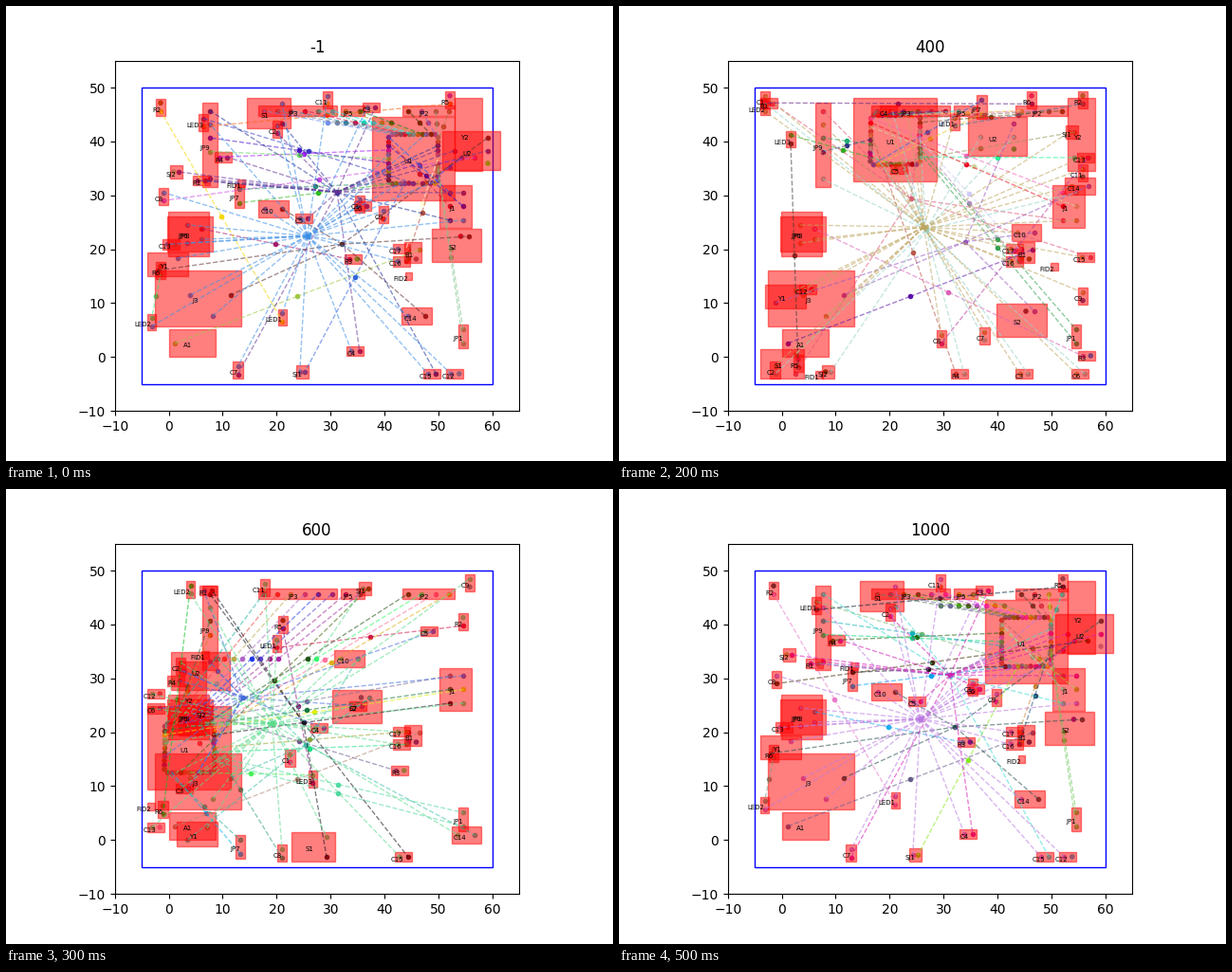
Animation of 640x480 px, one loop 600 ms. Source, as a matplotlib script:

```python
import random

import matplotlib.pyplot as plt
from matplotlib.animation import FuncAnimation
from matplotlib.patches import Rectangle

SCALE, X0, Y0 = 5.6862, 171.63, 370.34   # pixels per mm, pixel position of (0, 0)


def to_mm(x, y):
    return (x - X0) / SCALE, (Y0 - y) / SCALE


def row(count, pitch=14.44):
    return [(i - (count - 1) / 2) * pitch for i in range(count)]


def quad_pins(reach=26, pitch=4.55):
    steps = row(11, pitch)
    return ([(-reach, s) for s in steps] + [(s, reach) for s in steps]
            + [(reach, s) for s in steps] + [(s, -reach) for s in steps])


# name: (width, height, pin offsets), in pixels with y pointing down
SHAPES = {
    "A1": (49.5, 29, [(-19, 0.5)]),
    "B1": (18, 22, [(-5, -3), (6.5, -3), (-5, 7), (3, 7)]),
    "J1": (34, 45, [(x, y) for y in row(3) for x in (-6, 8.5)]),
    "J3": (91, 59, [(-8.5, -3.5), (15.5, 18.5), (34, -3.5)]),
    "JP1": (10.5, 25, [(0, y) for y in row(2)]),
    "JP2": (55, 11.5, [(x, 0) for x in row(4)]),
    "JP3": (83, 11.5, [(x, 0) for x in row(6)]),
    "JP5": (25, 11.5, [(x, 0) for x in row(2)]),
    "JP6": (43, 47, [(-1.5, -9.5), (-1.5, 9.5)]),
    "JP7": (10.5, 25, [(0, y) for y in row(2)]),
    "JP8": (48, 37, [(12, -5.5), (12, 5.5)]),
    "JP9": (16.5, 89, [(0, y) for y in (-36, -22, -7.5, 7, 36)]),
    "S1": (46, 31.5, [(14, -10.5), (14, 10.5)]),
    "S2": (52.5, 35, [(13.5, -9.5), (4.5, -9.5)]),
    "U1": (87.5, 87.5, quad_pins()),
    "U2": (61.5, 41, [(17.5, -13.5), (17.5, 0), (17.5, 13.5), (-17.5, 0)]),
    "Y1": (43.5, 25.5, [(-10.5, 6.5), (10.5, -6.5)]),
    "Y2": (28.5, 77.5, [(-7, 24.5), (7, 24.5)]),
}
KINDS = {
    "C": (18, 10.5, [(-4.3, 0), (4.3, 0)]),
    "R": (18, 10.5, [(-4.3, 0), (4.3, 0)]),
    "LED": (17.5, 9.3, [(-4.3, 0), (4.3, 0)]),
    "SJ": (13, 14, [(-2.7, 0), (2.7, 0)]),
    "FID": (7.2, 7.2, []),
}
SHAPES["C10"] = SHAPES["C14"] = (31.5, 18.2, [(-9, 0), (9, 0)])

FIXED = dict(
    A1=(196.5, 355.5), B1=(429.5, 260), J1=(474, 211.5), J3=(202.5, 308.5),
    JP1=(482, 348.5), JP2=(445.5, 110.5), JP3=(307.7, 110.5),
    JP5=(365.5, 110.5), JP6=(192.5, 240.5), JP8=(194, 240.5),
    JP9=(215, 146.5), C16=(417.5, 269.5), C17=(417.5, 256))

# Each layout: part centres and the names of parts standing upright
FIRST = (dict(
    C1=(373, 209), C2=(286, 130), C3=(385, 107), C4=(368.5, 364),
    C5=(314, 224), C6=(376, 211), C7=(244.5, 384.5), C8=(166, 201),
    C9=(398, 220.5), C10=(282, 214), C11=(339, 99), C12=(473.5, 388),
    C13=(174, 251.5), C14=(433, 327), C15=(449, 388), R1=(206, 184),
    R2=(163, 106.5), R3=(366, 267), R4=(229, 159.5), R5=(468, 99),
    R6=(163, 279), LED1=(291.5, 328.5), LED2=(153.5, 333.5),
    LED3=(208, 123), S1=(277, 113), S2=(475, 252.5), SJ1=(312.5, 386),
    SJ2=(179.5, 175), U1=(429.5, 161), U2=(490.5, 152.5), Y1=(170.5, 272.5),
    Y2=(487.5, 135.5), JP7=(246, 200.5), FID1=(248, 187), FID2=(424.5, 285)),
    "C1 C2 C7 C8 C9 C11 R2 R5 R6 LED1 LED2 LED3".split())

SECOND = (dict(
    C1=(154, 316), C2=(351, 260.5), C3=(492.5, 264), C4=(158, 102.5),
    C5=(492.5, 102.5), C6=(492.5, 388), C7=(275, 251.5), C8=(154, 384),
    C9=(304.5, 301), C10=(315, 107), C11=(154, 99), C12=(158, 263.5),
    C13=(157.5, 346), C14=(165, 298), C15=(279.5, 102.5), R1=(367, 139),
    R2=(335, 116), R3=(154, 298), R4=(198.5, 110.5), R5=(276, 275),
    R6=(347, 139), LED1=(153.5, 384), LED2=(280.5, 384), LED3=(422, 384),
    S1=(172, 282), S2=(279.5, 115), SJ1=(365.5, 204.5), SJ2=(495, 104),
    U1=(458, 141), U2=(364.5, 138), Y1=(170.5, 110), Y2=(200.5, 313.5),
    JP7=(482, 358.5), FID1=(326, 266), FID2=(436, 272.5)),
    "C1 C2 C7 C8 C9 C11 R2 R3 R5 R6 LED1 LED2 LED3".split())

THIRD = (dict(
    C1=(154, 99), C2=(164.5, 384), C3=(427, 388), C4=(284, 110.5),
    C5=(295.5, 172), C6=(486.5, 388), C7=(385.5, 348), C8=(340, 351.5),
    C9=(489, 306.5), C10=(429.5, 239), C11=(489, 176), C12=(199, 299),
    C13=(492, 160), C14=(486, 190), C15=(492.5, 265), R1=(158, 102.5),
    R2=(489, 99), R3=(493, 369), R4=(359.5, 388), R5=(189, 377),
    R6=(435, 99), LED1=(354, 122), LED2=(154, 106.5), LED3=(181, 140.5),
    S1=(172, 377.5), S2=(424.5, 331.5), SJ1=(477.5, 133), SJ2=(220.5, 386),
    U1=(291, 141), U2=(399, 137.5), Y1=(175.5, 306.5), Y2=(487.5, 135.5),
    JP7=(382.5, 106.5), FID1=(211, 389), FID2=(459, 275)),
    "C1 C2 C7 C8 C9 C11 R2 R5 R6 LED1 LED2 LED3".split())

FOURTH = (dict(
    C1=(299.5, 284), C2=(184, 187), C3=(188, 316), C4=(330.5, 252),
    C5=(446, 150), C6=(158, 231.5), C7=(371, 229), C8=(291, 384.5),
    C9=(489, 99), C10=(362, 179), C11=(273, 104), C12=(158, 216),
    C13=(158, 357), C14=(485.5, 365), C15=(419.5, 388), R1=(213, 107),
    R2=(482, 140), R3=(415.5, 297), R4=(179, 202.5), R5=(292, 143),
    R6=(165.5, 338.5), LED1=(285.5, 163), LED2=(194.5, 106),
    LED3=(323.5, 306), S1=(324, 377.5), S2=(370, 229.5), SJ1=(379, 105),
    SJ2=(211, 236), U1=(193, 273), U2=(205, 192), Y1=(201.5, 364),
    Y2=(196.5, 221), JP7=(247, 377.5), FID1=(210, 175), FID2=(153, 335)),
    "C1 C2 C8 C9 C11 R2 R5 R6 LED1 LED2 LED3".split())

FIFTH = (dict(
    C1=(253.5, 110.5), C2=(244, 313), C3=(178.5, 167), C4=(397, 267),
    C5=(279.5, 263), C6=(309, 286), C7=(223, 223), C8=(421, 179),
    C9=(457, 294), C10=(392, 171), C11=(157.5, 388), C12=(301, 230),
    C13=(430, 210), C14=(218, 106.5), C15=(492, 268), R1=(466.5, 103),
    R2=(388, 355), R3=(192, 132), R4=(283, 253), R5=(314, 263),
    R6=(360.5, 347), LED1=(153.5, 348.5), LED2=(153.5, 338.5),
    LED3=(436, 254), S1=(274.5, 283.5), S2=(181, 240), SJ1=(466.5, 386),
    SJ2=(155.5, 334), U1=(374.5, 275), U2=(329, 272), Y1=(262.5, 110),
    Y2=(286.5, 136), JP7=(482, 380.5), FID1=(288, 223), FID2=(364.5, 101)),
    "C2 C3 C4 C7 C8 C12 R2 R5 R6 LED1 LED2 LED3".split())

LAYOUTS = [FIRST, SECOND, THIRD, FOURTH, FIFTH, FIRST]
TITLES = ["-1", "200", "400", "600", "800", "1000"]

GROUND = [f"C{i}.0" for i in range(1, 18)] + (
    "U1.4 U1.13 U1.32 U1.41 JP9.1 J3.0 J3.1 J1.5 JP6.0 JP6.1 JP8.1 "
    "S1.0 Y1.1 LED1.0 LED2.1 SJ1.0").split()
SUPPLY = ("C2.1 C3.1 C4.1 C5.1 C6.1 C7.1 U1.7 U1.18 U1.25 J1.1 JP9.4 "
          "U2.1 U2.3 R1.0 R4.1 SJ2.1").split()
RESET = "J1.4 S1.1 C15.1 R1.1 JP9.0 U1.24".split()
INPUT = "U2.0 C14.1 C10.1 S2.0 J3.2 Y1.0".split()
SERIAL = ["JP1.0 U1.29".split(), "JP1.1 U1.30".split()]

PAIRS = [(f"JP3.{i}", f"U1.{33 + i}") for i in range(6)]
PAIRS += [pair.split("-") for pair in (
    "JP5.0-U1.39 JP5.1-U1.40 JP2.0-U1.42 JP2.1-U1.43 JP2.2-U1.22 "
    "JP2.3-U1.23 C17.1-U1.27 C16.1-U1.28 JP9.2-U1.6 JP9.3-U1.5 "
    "LED1.1-R2.1 LED2.0-R6.1 LED3.1-R5.1 A1.0-B1.1 J1.0-U1.0 J1.2-U1.1 "
    "J1.3-U1.2 JP7.0-U1.11 JP7.1-U1.12 JP8.0-R3.0 Y2.0-U1.31 Y2.1-C8.1 "
    "SJ1.1-U1.14 R4.0-U1.3 LED3.0-U1.16").split()]

NETS = [GROUND, SUPPLY, RESET, INPUT, *SERIAL, *PAIRS]

# Ground, supply, reset, input and serial colours for each iteration
PALETTES = [
    ["#3b8ee6", "#643296", "#20309a", "#5a3030", "#7fc48a"],
    ["#2a9636", "#aadc82", "#e13c64", "#64408c", "#4c4480"],
    ["#bea55f", "#96d2c8", "#dc5a78", "#965abe", "#32a050"],
    ["#5adc8c", "#466edc", "#181420", "#3cbeaa", "#50d8a0"],
    ["#231e5a", "#821e50", "#c846c8", "#707070", "#e8c070"],
    ["#b978e1", "#d71eb4", "#3cdcd2", "#285050", "#6ec85a"],
]


def shape_of(name):
    return SHAPES.get(name) or KINDS[name.rstrip("0123456789")]


def place(layout):
    """Return the boxes (x, y, w, h) by name and the pin positions by 'name.i'."""
    centres, upright = layout
    boxes, pins = {}, {}
    for name, (x, y) in {**FIXED, **centres}.items():
        w, h, offsets = shape_of(name)
        if name in upright:
            w, h = h, w
            offsets = [(dy, dx) for dx, dy in offsets]
        boxes[name] = (x, y, w, h)
        for i, (dx, dy) in enumerate(offsets):
            pins[f"{name}.{i}"] = to_mm(x + dx, y + dy)
    return boxes, pins


def dots(points, colors):
    xs, ys = zip(*points)
    ax.scatter(xs, ys, s=9, c=colors, zorder=1)


def draw_net(points, color):
    cx = sum(x for x, _ in points) / len(points)
    cy = sum(y for _, y in points) / len(points)
    for x, y in points:
        ax.plot([cx, x], [cy, y], "--", color=color, lw=1, alpha=0.55)
    dots(points + [(cx, cy)], [color])


def draw(frame):
    ax.clear()
    rng = random.Random(frame + 11)
    boxes, pins = place(LAYOUTS[frame])
    palette = PALETTES[frame]
    colors = palette + palette[-1:]
    colors += [tuple(rng.random() for _ in "rgb") for _ in PAIRS]

    ax.add_patch(Rectangle((-5, -5), 65, 55, fill=False, ec="blue"))
    used = {pin for net in NETS for pin in net}
    spare = [pos for pin, pos in pins.items() if pin not in used]
    dots(spare, [tuple(rng.random() for _ in "rgb") for _ in spare])
    for net, color in reversed(list(zip(NETS, colors))):
        draw_net([pins[pin] for pin in net], color)

    for name, (x, y, w, h) in boxes.items():
        corner = to_mm(x - w / 2, y + h / 2)
        ax.add_patch(Rectangle(corner, w / SCALE, h / SCALE, color="red", alpha=0.5))
        ax.text(*to_mm(x, y), name, fontsize=5, ha="right", va="top")

    ax.set_title(TITLES[frame])
    ax.set_xlim(-10, 65)
    ax.set_ylim(-10, 55)
    ax.set_aspect("equal")
    return []


fig, ax = plt.subplots(figsize=(6.4, 4.8), dpi=100)
anim = FuncAnimation(fig, draw, frames=6, interval=100, init_func=lambda: [],
                     repeat=True, repeat_delay=0)
plt.show()
```
